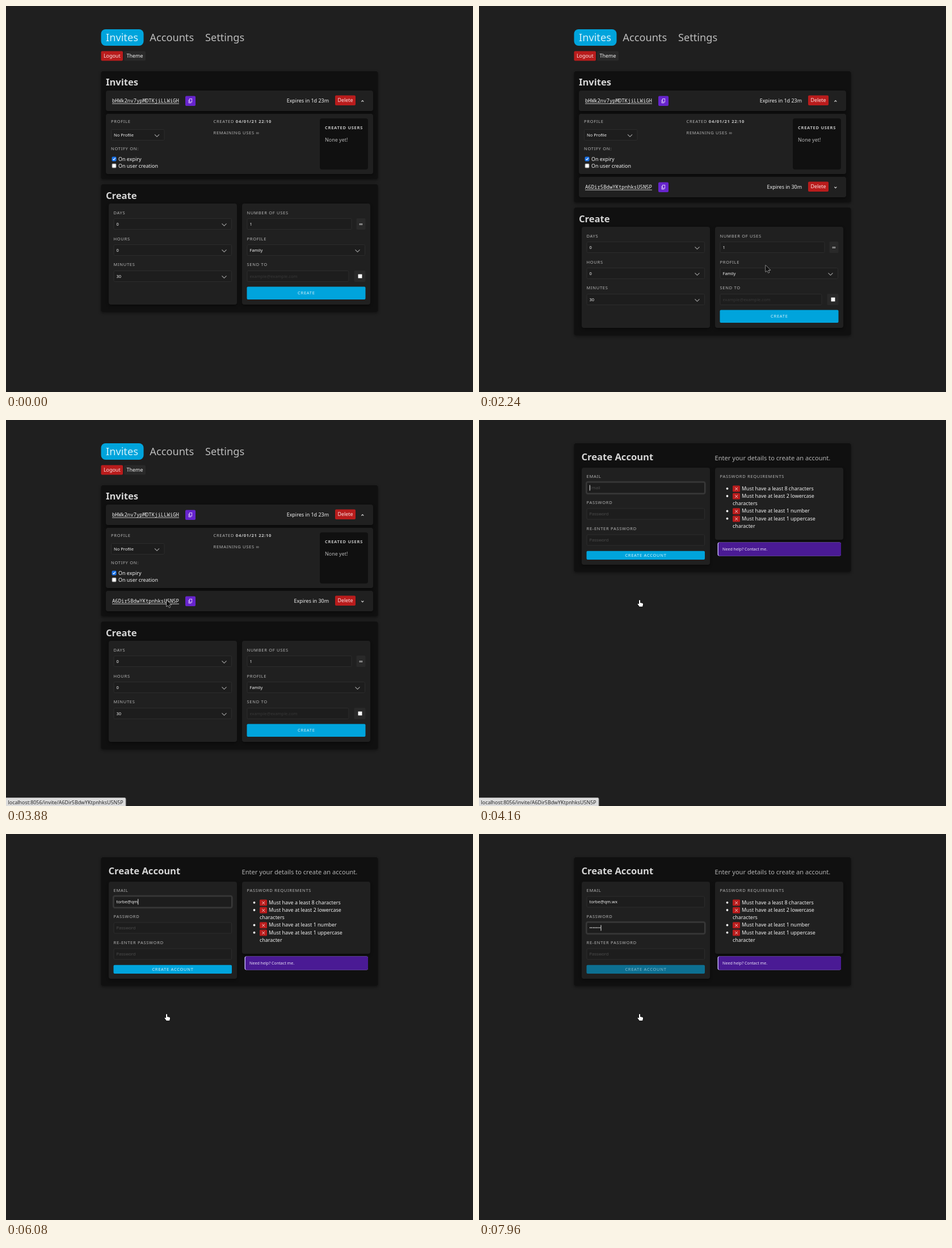
Animation of 823 by 680 pixels, one loop 8000 ms. Source, as an HTML page with a canvas:

```html
<!DOCTYPE html>
<html lang="en">
<head>
<meta charset="utf-8">
<title>Invites</title>
<style>
html, body { margin: 0; width: 100%; height: 100%; overflow: hidden; background: #1f1f1f; }
canvas { display: block; width: 823px; height: 680px; }
</style>
</head>
<body>
<canvas id="stage"></canvas>
<script>
const W = 823, H = 680, LOOP = 8000;
const canvas = document.getElementById('stage');
const ctx = canvas.getContext('2d');
const ratio = window.devicePixelRatio || 1;
canvas.width = W * ratio;
canvas.height = H * ratio;

const SANS = '"Noto Sans", sans-serif';
const MONO = '"Noto Sans Mono", monospace';
const BG = '#1f1f1f', DARK = '#101010', CARD = '#202020', LINE = '#2c2c2c', CHIP = '#292929';
const BLUE = '#00a4dc', RED = '#b91c1c', PURPLE = '#6724cd';
const WHITE = '#f2f2f2', GREY = '#b4b4b4', FAINT = '#4c4c4c', PALE = '#d2f0fa';
const BODY = 8.95, FIELD = 7.5;

const CODES = ['bHWk2nv7ypMDTKjiLLWiGH', 'A6Dir5BdwYKtpnhksU5N5P'];
const EMAIL = 'torbe@qm.wx';

// Moments of the story, in ms
const ENTER = 920, HOVER = 1160, CREATED = 1760, LEAVE = 1960, ARRIVE = 2760;
const LINK = 2624, PAGE = 4120, STATUS_OFF = 4280;
const TYPE_EMAIL = 4960, TYPE_STEP = 155;
const FOCUS_PASS = 6780, TYPE_PASS = 7000, PASS_STEP = 150;

function box(x, y, w, h, fill, r = 2, line) {
  ctx.beginPath();
  ctx.roundRect(x, y, w, h, r);
  if (fill) { ctx.fillStyle = fill; ctx.fill(); }
  if (line) { ctx.strokeStyle = line; ctx.lineWidth = 1; ctx.stroke(); }
}

function card(x, y, w, h, fill) {
  ctx.save();
  ctx.shadowColor = 'rgba(0,0,0,.45)';
  ctx.shadowBlur = 5 * ratio;
  ctx.shadowOffsetY = 2 * ratio;
  box(x, y, w, h, fill, 4);
  ctx.restore();
}

// y is the middle of the capital letters; returns the advance width
function text(s, x, y, size, color, o = {}) {
  ctx.font = `${o.weight || 400} ${size}px ${o.family || SANS}`;
  ctx.letterSpacing = `${o.gap || 0}px`;
  ctx.textAlign = o.align || 'left';
  ctx.fillStyle = color;
  ctx.fillText(s, x, y + size * 0.357);
  const width = ctx.measureText(s).width;
  ctx.letterSpacing = '0px';
  return width;
}

const label = (s, x, y, o = {}) => text(s, x, y, 7.5, o.color || GREY, { gap: 0.72, ...o });
const heading = (s, x, y) => text(s, x, y, 16.6, '#d6d6d6', { weight: 600 });

function polyline(points, color, width = 1) {
  ctx.beginPath();
  points.forEach(([x, y]) => ctx.lineTo(x, y));
  ctx.strokeStyle = color;
  ctx.lineWidth = width;
  ctx.stroke();
}

// dir 1 points down, -1 points up
function chevron(x, y, size = 4, dir = 1, color = '#a8a8a8') {
  const d = size / 2 * dir;
  polyline([[x - size, y - d], [x, y + d], [x + size, y - d]], color, 1.1);
}

function field(x, y, w, value, color = WHITE, focus = false) {
  if (focus) {
    ctx.beginPath();
    ctx.roundRect(x - 0.5, y - 0.5, w + 1, 21, 3);
    ctx.strokeStyle = '#353535';
    ctx.lineWidth = 2.4;
    ctx.stroke();
  }
  box(x + 0.5, y + 0.5, w - 1, 19, '#1d1d1d', 2, focus ? '#3d3d3d' : LINE);
  return text(value, x + 5, y + 10, FIELD, color);
}

function select(x, y, w, value) {
  field(x, y, w, value);
  chevron(x + w - 13.5, y + 11.3);
}

function button(x, y, w, h, fill, caption, color, size = BODY) {
  box(x, y, w, h, fill);
  text(caption, x + w / 2, y + h / 2, size, color, { align: 'center' });
}

function checkbox(x, y, on) {
  box(x, y, 7, 7, on ? '#1a73e8' : '#fff', 1, on ? '#1a73e8' : '#8a8a8a');
  if (on) polyline([[x + 1.5, y + 3.6], [x + 3, y + 5.2], [x + 5.7, y + 1.7]], '#fff', 1.1);
}

function inviteRow(y, code, expiry, open) {
  card(176, y, 471, 36, CARD);
  const w = text(code, 187, y + 18, BODY, WHITE, { family: MONO });
  ctx.fillRect(187, y + 22.6, w, 0.8);
  box(316, y + 9.5, 18, 17.5, PURPLE);
  ctx.strokeStyle = '#e4d8fb';
  ctx.lineWidth = 0.9;
  ctx.strokeRect(323.6, y + 14.5, 4, 5.6);
  polyline([[322, y + 16], [322, y + 21.8], [326.4, y + 21.8]], '#e4d8fb', 0.9);
  text(expiry, 569, y + 17.7, BODY, WHITE, { align: 'right' });
  button(580, y + 8.5, 36, 17.5, RED, 'Delete', '#fbe3e3');
  chevron(628.3, y + 18.6, 2, open ? -1 : 1, '#e0e0e0');
}

function inviteDetails() {
  card(176, 190, 471, 106, CARD);
  label('PROFILE', 185, 203.5);
  select(185, 217, 94.5, 'No Profile');
  label('NOTIFY ON:', 185, 251);
  checkbox(187, 266, true);
  text('On expiry', 198, 270, BODY, WHITE);
  checkbox(187, 278, false);
  text('On user creation', 198, 281.7, BODY, WHITE);

  const w = label('CREATED ', 365.5, 203.5);
  label('04/01/21 22:10', 365.5 + w, 203.5, { weight: 700, color: '#c8c8c8' });
  label('REMAINING USES ∞', 365.5, 223);

  box(553, 198, 85, 90, DARK, 4);
  label('CREATED USERS', 562, 214, { weight: 700, color: '#c4c4c4' });
  text('None yet!', 562, 235.5, BODY, GREY);
}

function createForm(hover) {
  card(167.5, 314, 488, 225, DARK);
  heading('Create', 176, 334);
  card(181, 348, 226, 178, CARD);
  [['DAYS', '0'], ['HOURS', '0'], ['MINUTES', '30']].forEach(([name, value], i) => {
    label(name, 189.5, 364 + i * 45.9);
    select(189.5, 374 + i * 46, 208.5, value);
  });

  card(416, 348, 226, 178, CARD);
  label('NUMBER OF USES', 424.5, 364);
  field(424.5, 374, 185, '1');
  button(617.5, 374, 16, 20, CHIP, '∞', WHITE);
  label('PROFILE', 424.5, 409.9);
  select(424.5, 420, 208.5, 'Family');
  label('SEND TO', 424.5, 455.8);
  field(424.5, 466, 180, 'example@example.com', '#383838');
  box(613.5, 466, 20, 20, CHIP);
  checkbox(620.5, 472.5, false);
  box(424.5, 494.5, 209, 22.5, hover ? '#0299d3' : BLUE);
  label('CREATE', 529.3, 505.8, { align: 'center', color: PALE });
}

function invitesPage(t) {
  const created = t >= CREATED;
  const shift = created ? 41 : 0;

  box(167.5, 41, 75, 29, BLUE, 8);
  text('Invites', 176, 55.7, 18.2, PALE);
  text('Accounts', 253.3, 55.7, 18.2, '#bcbcbc');
  text('Settings', 351, 55.7, 18.2, '#bcbcbc');
  button(167.5, 79.5, 38.5, 17, RED, 'Logout', '#fbe3e3');
  button(208, 79.5, 38, 17, CHIP, 'Theme', WHITE);

  card(167.5, 115, 488, 190 + shift, DARK);
  heading('Invites', 176, 134.5);
  inviteRow(149, CODES[0], 'Expires in 1d 23m', true);
  inviteDetails();
  if (created) inviteRow(301, CODES[1], 'Expires in 30m', false);

  ctx.save();
  ctx.translate(0, shift);
  createForm(t >= HOVER && !created);
  ctx.restore();
}

function requirement(y, first, second) {
  ctx.beginPath();
  ctx.arc(437.5, y + 0.5, 1.9, 0, Math.PI * 2);
  ctx.fillStyle = WHITE;
  ctx.fill();
  box(447, y - 4.7, 13, 11, RED, 1.5);
  polyline([[451.2, y - 1.4], [456, y + 3.4]], '#fbe3e3', 0.9);
  polyline([[456, y - 1.4], [451.2, y + 3.4]], '#fbe3e3', 0.9);
  text(first, 463, y + 0.3, BODY, WHITE);
  if (second) text(second, 447, y + 13.5, BODY, WHITE);
}

const typed = (t, start, step, max) =>
  t < start ? 0 : Math.min(max, 1 + Math.floor((t - start) / step));

function entry(y, value, hint, focus) {
  const w = field(189.5, y, 208.5, value || hint, value ? WHITE : FAINT, focus);
  if (focus) {
    ctx.fillStyle = '#fff';
    ctx.fillRect(194.8 + (value ? w : 0), y + 5, 0.9, 10);
  }
}

function accountPage(t) {
  const email = EMAIL.slice(0, typed(t, TYPE_EMAIL, TYPE_STEP, EMAIL.length));
  const dots = '•'.repeat(typed(t, TYPE_PASS, PASS_STEP, 7));
  const onPass = t >= FOCUS_PASS;

  card(167.5, 41, 488, 226.5, DARK);
  heading('Create Account', 180.5, 65.3);
  text('Enter your details to create an account.', 415.5, 67.2, 11.1, GREY);

  card(181, 84, 226, 171, CARD);
  label('EMAIL', 189.5, 99.5);
  entry(109.5, email, 'Email', !onPass);
  label('PASSWORD', 189.5, 145.4);
  entry(155.5, dots, 'Password', onPass);
  label('RE-ENTER PASSWORD', 189.5, 191.6);
  entry(201.5, '', 'Password', false);
  ctx.save();
  if (dots) ctx.globalAlpha = 0.6;
  box(189.5, 230.7, 208.5, 15.3, BLUE);
  label('CREATE ACCOUNT', 294, 238.4, { align: 'center', color: PALE });
  ctx.restore();

  card(416, 84, 226, 127, CARD);
  label('PASSWORD REQUIREMENTS', 424.5, 99.5);
  requirement(120.3, 'Must have a least 8 characters');
  requirement(133.5, 'Must have at least 2 lowercase', 'characters');
  requirement(160, 'Must have at least 1 number');
  requirement(173.2, 'Must have at least 1 uppercase', 'character');

  box(420.5, 215.5, 217.5, 24, '#c4b5fd', 3);
  box(422, 215.5, 216, 24, '#4a1a94', 3);
  text('Need help? Contact me.', 429, 227.3, 7.1, '#e9e2f8');
}

function statusBar() {
  box(-3, 665.5, 214, 18, '#dcdcdc', 2, '#9c9c9c');
  text('localhost:8056/invite/' + CODES[1], 3.5, 673.4, 8.85, '#2a2a2a');
}

const ARROW = new Path2D('M0 0V11.6L2.7 9.2L4.6 13.4L6.4 12.6L4.6 8.5H8.4Z');
const HAND = new Path2D('M-1 1Q0 -.8 1.1 1V5L5 5.8Q6.3 6.2 6.1 7.7L5.2 11.8H-.4Q-1.6 9.8 -3.4 7.8Q-3.6 6.2 -2.2 6.6L-1 7.6Z');

function drawCursor(t) {
  if (t < ENTER) return;
  const ease = (a, b) => {
    const p = Math.min(1, Math.max(0, (t - a) / (b - a)));
    return p * p * (3 - 2 * p);
  };
  const come = ease(ENTER - 40, HOVER + 40), go = ease(LEAVE, ARRIVE);
  const x = 701 - 108 * come - 310 * go;
  const y = 523 - 11 * come - 195 * go;
  const hand = (t >= HOVER && t < CREATED) || t >= PAGE;
  ctx.save();
  ctx.translate(x, y);
  ctx.lineJoin = 'round';
  ctx.lineWidth = hand ? 1.2 : 1;
  ctx.strokeStyle = hand ? '#000' : '#fff';
  ctx.fillStyle = hand ? '#fff' : '#111';
  const shape = hand ? HAND : ARROW;
  ctx.stroke(shape);
  ctx.fill(shape);
  ctx.restore();
}

function frame() {
  const t = performance.now() % LOOP;
  ctx.setTransform(ratio, 0, 0, ratio, 0, 0);
  ctx.fillStyle = BG;
  ctx.fillRect(0, 0, W, H);
  if (t < PAGE) invitesPage(t);
  else accountPage(t);
  if (t >= LINK && t < STATUS_OFF) statusBar();
  drawCursor(t);
  requestAnimationFrame(frame);
}
frame();
</script>
</body>
</html>
```
